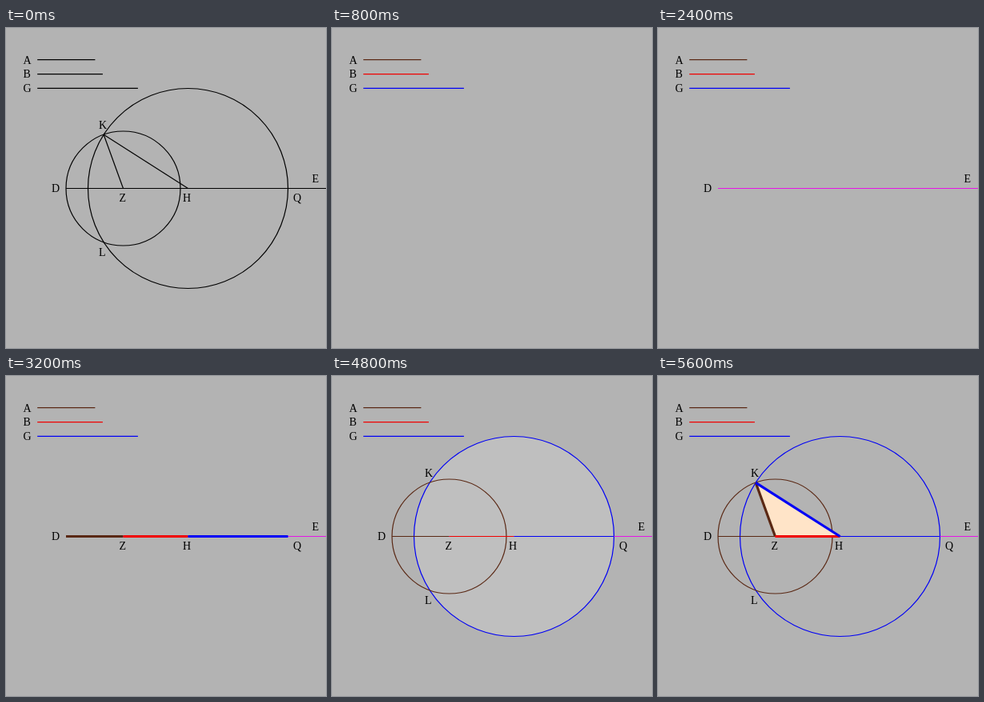
An HTML page with a canvas that plays this animation: 400x400 px, repeating every 6.4 s.

```html
<!DOCTYPE html>
<html lang="en">
<meta charset="utf-8">
<title>Triangle from three segments</title>
<style>
  html, body { margin: 0; width: 100%; height: 100%; overflow: hidden; background: #b3b3b3; }
  canvas { display: block; }
</style>
<canvas width="400" height="400"></canvas>
<script>
const ctx = document.querySelector('canvas').getContext('2d');
const STEP = 800, STEPS = 8;
const BROWN = '#5a2814', RED = '#f00000', BLUE = '#0000f5', MAGENTA = '#e614e6';
const LIGHT = '#bfbfbf', BISQUE = '#ffe4c8';

const a = 71.5, b = 81, g = 125, axis = 200.5;
const D = [75, axis], E = [400, axis];
const Z = [D[0] + a, axis], H = [Z[0] + b, axis], Q = [H[0] + g, axis];
const foot = (a * a - g * g + b * b) / (2 * b);
const K = [Z[0] + foot, axis - Math.sqrt(a * a - foot * foot)];

// Label positions: left edge and baseline
const labels = {
  A: [21.5, 44.5], B: [21.5, 62], G: [21.5, 79.5], D: [57, 204.5], E: [382.5, 192.5],
  Z: [141.5, 217], H: [221, 217], Q: [359, 217], K: [116, 125.5], L: [116, 284.5]
};

function line(p, q, color, width = 1.2) {
  ctx.strokeStyle = color;
  ctx.lineWidth = width;
  ctx.beginPath();
  ctx.moveTo(...p);
  ctx.lineTo(...q);
  ctx.stroke();
}

function disc(center, radius, color, filled) {
  ctx.beginPath();
  ctx.arc(...center, radius, 0, 2 * Math.PI);
  if (filled) {
    ctx.fillStyle = LIGHT;
    ctx.fill();
  }
  ctx.strokeStyle = color;
  ctx.lineWidth = 1.2;
  ctx.stroke();
}

function drawGiven(brown, red, blue, extended) {
  const rows = [[a, brown], [b, red], [g, blue]];
  rows.forEach(([length, color], i) => {
    const y = 39.7 + 17.85 * i, end = 39.2 + length + 0.7;
    line([39.2, y], [end, y], color, extended ? 3 : 1.2);
    if (extended) {
      const [more, next] = rows[(i + 1) % 3];
      line([end, y], [end + more, y], next, 3);
    }
  });
}

function drawTriangle(brown, red, blue, width) {
  if (width > 2) {
    ctx.fillStyle = BISQUE;
    ctx.beginPath();
    for (const p of [Z, H, K]) ctx.lineTo(...p);
    ctx.fill();
  }
  line(Z, K, brown, width);
  line(Z, H, red, width);
  line(K, H, blue, width);
}

function drawStep(step) {
  const stage = step || STEPS;
  const plain = stage === STEPS;
  const [brown, red, blue, magenta] = plain ? Array(4).fill('#000') : [BROWN, RED, BLUE, MAGENTA];

  ctx.fillStyle = '#b3b3b3';
  ctx.fillRect(0, 0, 400, 400);

  if (stage >= 6) disc(H, g, blue, stage === 6);
  if (stage >= 5) disc(Z, a, brown, stage === 5);
  drawGiven(brown, red, blue, stage === 2);

  if (stage >= 3) line(D, E, magenta);
  if (stage >= 4) {
    const width = stage === 4 ? 3 : 1.2;
    line(D, Z, brown, width);
    line(Z, H, red, width);
    line(H, Q, blue, width);
  }
  if (stage >= 7) drawTriangle(brown, red, blue, plain ? 1.2 : 3.2);

  const shown = 'ABG' + (stage >= 3 ? 'DE' : '') + (stage >= 4 ? 'ZHQ' : '') +
    (stage >= 5 ? 'K' : '') + (stage >= 6 ? 'L' : '');
  ctx.fillStyle = '#000';
  ctx.font = '14px "Liberation Serif", Times, serif';
  for (const name of shown) ctx.fillText(name, ...labels[name]);
}

const start = performance.now();
function tick() {
  drawStep(Math.floor((performance.now() - start) / STEP) % STEPS);
  requestAnimationFrame(tick);
}
tick();
</script>
</html>
```
